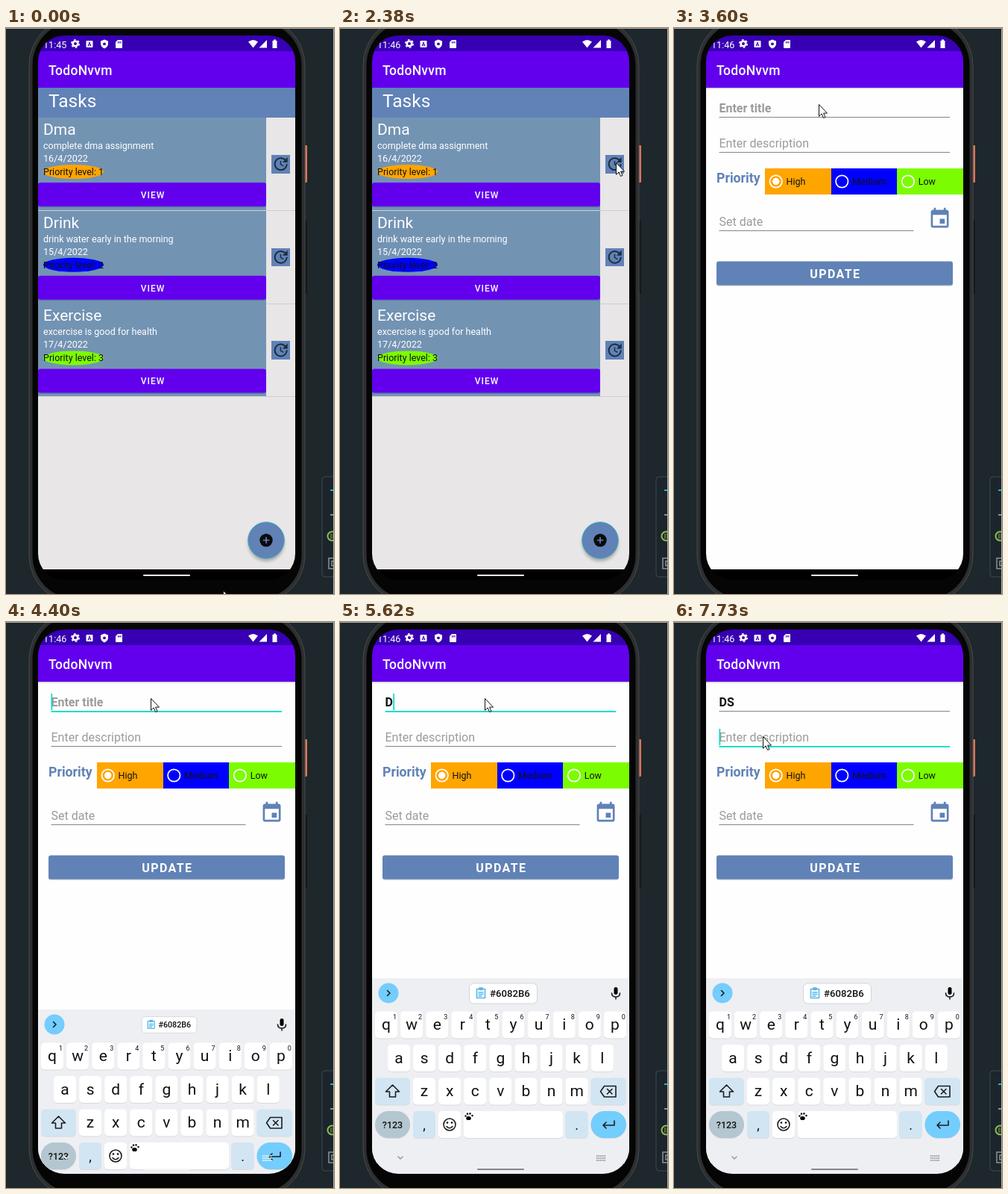
An HTML page for the animation above (8000 ms loop, 440x758 px).

```html
<!DOCTYPE html>
<html lang="en">
<head>
<meta charset="utf-8">
<title>Todo app demo</title>
<style>
html, body { margin: 0; width: 100%; height: 100%; overflow: hidden; background: #1e272b; }
svg { display: block; width: 440px; height: 758px; }
text { font-family: Roboto, sans-serif; fill: #fff; white-space: pre; }
.b { font-weight: 700; }
.m { font-weight: 500; }
.mid { text-anchor: middle; }
.k { fill: #111; }
.hint { fill: #9b9b9b; font-size: 16px; }
.line { fill: none; stroke: currentColor; stroke-width: 1.6; stroke-linecap: round; stroke-linejoin: round; }
</style>
</head>
<body>
<svg viewBox="0 0 440 758" xmlns="http://www.w3.org/2000/svg">
  <defs>
    <clipPath id="screen"><rect x="43" y="10" width="345" height="729" rx="35"/></clipPath>
    <filter id="soft" x="-30%" y="-30%" width="160%" height="170%"><feGaussianBlur stdDeviation="2"/></filter>
  </defs>

  <rect width="440" height="758" fill="#1e272b"/>
  <rect x="400" y="157" width="4" height="50" rx="1" fill="#d9775a"/>
  <rect x="400" y="258" width="4" height="98" rx="1" fill="#15191b"/>
  <rect x="31" y="-14" width="370" height="784" rx="64" fill="#2c2e2f" stroke="#484b4d"/>
  <rect x="35.500" y="-9" width="361" height="774" rx="59" fill="#050505"/>

  <g fill="none">
    <rect x="424" y="601" width="30" height="134" rx="4" fill="#1b252b" stroke="#3c4a54"/>
    <path d="M435 619h5" stroke="#1fb6c4" stroke-width="2"/>
    <path d="M435 652h5" stroke="#8a9297" stroke-width="2"/>
    <circle cx="437.500" cy="680.500" r="6" stroke="#93bd4c" stroke-width="2"/>
    <path d="M436 677v7m3-7v7" stroke="#93bd4c"/>
    <path d="M440 710h-7v14h7m0-10h-3v6h3" stroke="#8a9297" stroke-width="1.500"/>
  </g>
  <path d="M0 .5h439.500v758" fill="none" stroke="#a9adaf"/>

  <g clip-path="url(#screen)">
    <rect x="43" y="10" width="345" height="729" fill="#000"/>
    <g id="list"></g>
    <g id="form"></g>
    <rect x="43" y="10" width="345" height="21" fill="#3700b3"/>
    <rect x="43" y="31" width="345" height="49" fill="#6200ee"/>
    <text class="m" x="57" y="63" font-size="17.500" letter-spacing=".25">TodoNvvm</text>
    <text id="clock" x="50" y="26.500" font-size="12.600"></text>
    <g fill="#fff">
      <circle cx="93" cy="21" r="3.300" fill="none" stroke="#fff" stroke-width="2.600"/>
      <circle cx="93" cy="21" r="5.200" fill="none" stroke="#fff" stroke-width="1.600" stroke-dasharray="2.700 2.745"/>
      <rect x="107.500" y="17" width="9" height="9" rx="1"/>
      <path d="M110 24.500l2-5.500 2 5.500m-3.300-1.700h2.600" fill="none" stroke="#3700b3"/>
      <path d="M132 15.500l5 2v3.500q0 4-5 6.500q-5-2.500-5-6.500v-3.500z"/>
      <circle cx="132" cy="21.300" r="1.900" fill="#3700b3"/>
      <path d="M150 16h5q1 0 1 1v9q0 1-1 1h-7q-1 0-1-1v-7z"/>
      <path d="M150.500 18v2.500m1.800-2.500v2.500m1.800-2.500v2.500" stroke="#3700b3"/>
      <path d="M325 18.500q6.500-5 13 0l-6.500 8z"/>
      <path d="M350 16v10.500h-10.500z"/>
      <path d="M357.500 17h1.500v-1.500h3v1.500h1.500v10h-6z"/>
    </g>
    <g id="board"></g>
    <g id="nav">
      <path class="line" d="M78 716l3 3 3-3"/>
      <path d="M344 715h12m-12 3h12m-12 3h12" stroke="currentColor" stroke-width="1.800" stroke-dasharray="1.600 1"/>
    </g>
    <rect id="pill" x="184" y="732" width="63" height="2" rx="1"/>
  </g>
  <path id="mouse" d="M.5 .5v15.800l3.600-3.400 2.500 5.600 2.400-1-2.400-5.400h4.900z" fill="#fff" stroke="#111" stroke-linejoin="round"/>
</svg>
<script>
const $ = id => document.getElementById(id);
const rect = (x, y, w, h, fill, rx = 0, more = '') =>
  `<rect x="${x}" y="${y}" width="${w}" height="${h}" rx="${rx}" fill="${fill}" ${more}/>`;
const text = (x, y, str, size, cls = '', more = '') =>
  `<text x="${x}" y="${y}" font-size="${size}" class="${cls}" ${more}>${str}</text>`;
const BLUE = '#6082b6', TEAL = '#03dac5', CRISP = 'shape-rendering="crispEdges"';

// Task list
const UPDATE = 'M21 10.120h-6.780l2.740-2.820c-2.730-2.700-7.150-2.800-9.880-.1-2.730 2.710-2.730 7.080 0 9.790s7.150 2.710 9.880 0C18.320 15.650 19 14.080 19 12.100h2c0 1.980-.88 4.550-2.640 6.290-3.510 3.480-9.210 3.480-12.720 0-3.500-3.470-3.530-9.110-.02-12.580s9.140-3.470 12.650 0L21 3zM12.500 8v4.250l3.500 2.080-.72 1.210L11 13V8z';

const task = ([title, note, date, color], i) => `<g transform="translate(0 ${i * 124.7})">
  ${rect(43, 120, 306, 124, '#7393b3', 0, CRISP)}
  ${rect(43, 244, 345, 1, '#cfcfd0', 0, CRISP)}
  ${text(50, 143, title, 21)}
  ${text(50, 162, note, 12.5)}
  ${text(50, 179, date, 12.6)}
  <ellipse cx="90.500" cy="192.500" rx="40.500" ry="9.500" fill="${color}"/>
  ${text(50, 197, 'Priority level: ' + (i + 1), 12.5, 'k')}
  ${rect(43, 208.5, 306, 32, '#3d5f8a', 3, 'opacity=".4"')}
  ${rect(43, 207, 306, 32, '#6200ee', 3)}
  ${text(197, 228, 'VIEW', 12, 'm mid', 'letter-spacing="1.050"')}
  ${rect(356, 170, 25, 24.5, BLUE, 0, CRISP)}
  <path transform="translate(356.700 170)" d="${UPDATE}" fill="#1d2c3c"/>
</g>`;

$('list').innerHTML = rect(43, 80, 345, 645, '#e8e6e7') + rect(43, 80, 345, 40, BLUE) +
  text(57, 106, 'Tasks', 24.5) + [
    ['Dma', 'complete dma assignment', '16/4/2022', '#ffa500'],
    ['Drink', 'drink water early in the morning', '15/4/2022', '#0000ff'],
    ['Exercise', 'excercise is good for health', '17/4/2022', '#7cfc00']
  ].map(task).join('') + `
  <circle cx="349" cy="690" r="24" fill="#000" opacity=".28" filter="url(#soft)"/>
  <circle cx="349" cy="686" r="24.300" fill="${BLUE}" stroke="#38a9bd"/>
  <circle cx="349" cy="686" r="8.700" fill="#0a0a0a"/>
  <path d="M344.700 686h8.600m-4.300-4.300v8.600" stroke="${BLUE}" stroke-width="1.700"/>`;

// Edit form
const EVENT = 'M17 12h-5v5h5zM16 1v2H8V1H6v2H5c-1.110 0-1.990.9-1.990 2L3 19c0 1.100.89 2 2 2h14c1.100 0 2-.9 2-2V5c0-1.100-.9-2-2-2h-1V1zm3 18H5V8h14z';

const radio = ([label, color], i) => {
  const x = 122 + i * 88.6;
  return rect(x, 188, 88.6, 35, color, 0, CRISP) +
    `<circle cx="${x + 14.7}" cy="205.500" r="8.200" fill="none" stroke="#fff" stroke-width="1.700"/>` +
    (i ? '' : `<circle cx="${x + 14.7}" cy="205.500" r="4.700" fill="#fff"/>`) +
    text(x + 28.5, 210, label, 12.5, 'k');
};

$('form').innerHTML = rect(43, 80, 345, 645, '#fefefe') + rect(43, 80, 345, 1.5, '#d5d5d8') +
  text(60.5, 113, 'Enter title', 16, 'hint b', 'id="hint"') +
  text(60.5, 113, '', 16, 'k b', 'id="typed"') +
  text(60.5, 160, 'Enter description', 16, 'hint') +
  text(60.5, 265, 'Set date', 16, 'hint') +
  rect(60.5, 119, 309.5, 1, '#858585', 0, 'id="line0"') +
  rect(60.5, 166, 309.5, 1, '#858585', 0, 'id="line1"') +
  rect(60.5, 271, 261, 1, '#858585') +
  text(57, 207, 'Priority', 17.7, 'b', `style="fill:${BLUE}"`) +
  [['High', '#ffa500'], ['Medium', '#0000ff'], ['Low', '#7cfc00']].map(radio).join('') +
  `<path transform="translate(340.600 239.500) scale(1.330)" d="${EVENT}" fill="${BLUE}"/>` +
  rect(57, 314, 317, 31.5, '#777', 3, 'opacity=".4"') + rect(57, 312.5, 317, 32, BLUE, 3) +
  text(216.4, 335, 'UPDATE', 16, 'b mid', 'letter-spacing="1.400"') +
  rect(0, 0, 1.7, 22, TEAL, 0, 'id="caret"');

// Keyboard
const PALE = '#d2e5f3', SKY = '#73cdfd', PITCH = 34.1;
const key = (x, y, w, fill = '#fff', rx = 5) =>
  rect(x, y + 1, w, 36, '#d9dade', rx) + rect(x, y, w, 36, fill, rx);
const letters = (str, x0, y) => [...str].map((c, i) => {
  const x = x0 + i * PITCH;
  return key(x, y, 30) + text(x + 15, y + 24.5, c, 21, 'k mid') +
    (y < 530 ? text(x + 26.5, y + 10, (i + 1) % 10, 9, 'k mid') : '');
}).join('');

$('board').innerHTML = rect(43, 477, 345, 300, '#eeeff2') +
  letters('qwertyuiop', 47, 521.5) + letters('asdfghjkl', 64, 566) + letters('zxcvbnm', 98, 610.5) +
  key(47, 610.5, 47, PALE) + key(336.5, 610.5, 47.5, PALE) +
  key(47, 655, 47, '#b4c6d0', 18) + key(98, 655, 30, PALE) + key(132, 655, 30) +
  key(166, 655, 133) + key(302, 655, 30.5, PALE) + key(336.5, 655, 47.5, SKY, 18) +
  text(70.5, 678, '?123', 12.5, 'k m mid') + text(113, 680, ',', 18, 'k mid') + text(317.5, 680, '.', 18, 'k mid') +
  `<circle cx="65" cy="497" r="13.500" fill="${SKY}"/>
  <g color="#1c1c1e">
    <path class="line" d="M63.500 493.500l3.500 3.500-3.500 3.500"/>
    <path class="line" d="M70.500 620l-9 9h5v7h8v-7h5z"/>
    <path class="line" d="M354.500 621.500h15.500v14.500h-15.500l-5-7.250zM358.500 625.500l6.500 6.500m0-6.500l-6.500 6.500"/>
    <path class="line" d="M368 668v6h-15m4-4l-4 4 4 4"/>
    <circle class="line" cx="147" cy="673" r="8"/>
    <path class="line" d="M143 675.500q4 4.500 8 0"/>
    <circle cx="144" cy="670.500" r="1.300"/><circle cx="150" cy="670.500" r="1.300"/>
    <ellipse cx="172.500" cy="664.500" rx="3.300" ry="2.600"/>
    <path d="M168.500 661.500v.1m2.500-3v.1m3.500-.3v.1m3 2.500v.1" stroke="currentColor" stroke-width="2.600" stroke-linecap="round"/>
    <rect x="367.500" y="489" width="5" height="10" rx="2.500"/>
    <path class="line" d="M364.500 497q0 5 5.500 5t5.500-5m-5.500 5v3"/>
  </g>
  <g id="chip">
    ${rect(173.5, 484, 91, 27, '#fff', 6, 'stroke="#d3d5d9"')}
    <path class="line" color="#55b7e8" d="M183.500 491.500h11v12h-11zM187 490h4v2.500h-4zM186 496h6m-6 2.500h6m-6 2.500h4"/>
    ${text(201, 502.3, '#6082B6', 13.2, 'k m')}
  </g>`;

// Stepped timelines: [time, ...values]
const at = (track, t) => track.findLast(s => s[0] <= t).slice(1);

const MOUSE = [[0, 291, 753], [260, 269, 657], [400, 238, 490], [520, 223, 350], [640, 214, 268],
  [760, 210, 230], [880, 207, 213], [1000, 207, 208], [1150, 207, 212], [1300, 235, 201],
  [1420, 300, 183], [1550, 345, 174], [1670, 362, 170], [1820, 368, 177], [1950, 370, 180],
  [3180, 270, 148], [3300, 215, 127], [3450, 196, 105], [3600, 194, 102],
  [6950, 165, 120], [7100, 132, 145], [7220, 119, 153]];
const CLOCK = [[0, '11:45'], [2380, '11:46']];
const TYPED = [[0, ''], [5320, 'D'], [6140, 'DS']];
const FOCUS = [[0, -1], [4140, 0], [7610, 1]];
const CARET = [[0, 0], [4280, 1], [4670, 0], [5200, 1], [5870, 0], [6140, 1], [6670, 0], [7220, 1], [7610, 0], [7730, 1]];
const CARET_X = { '': 60.5, D: 71.3, DS: 81.3 };
const BOARD = [[0, 300, .8], [4280, 130, .8], [4400, 42, .81], [4550, 6, .95], [4670, 0, 1]];
const NAV = [[0, '#fff', '#f4f4f4'], [4400, '#f4f8fa', '#f4f4f4'], [4820, '#c8cacc', '#b8b9bb'], [4940, '#9a9c9f', '#85878a']];

const set = (id, attrs) => { for (const k in attrs) $(id).setAttribute(k, attrs[k]); };
const show = (id, on) => { $(id).style.display = on ? '' : 'none'; };

function draw(t) {
  const [typed] = at(TYPED, t), [focus] = at(FOCUS, t), [dy, zoom] = at(BOARD, t), [icons, pill] = at(NAV, t);
  const open = t >= 4280;
  set('mouse', { transform: `translate(${at(MOUSE, t)})` });
  $('clock').textContent = at(CLOCK, t)[0];
  $('typed').textContent = typed;
  show('list', t < 2500);
  show('form', t >= 2500);
  show('hint', !typed);
  [0, 1].forEach(i => set('line' + i, focus === i
    ? { height: 1.8, fill: TEAL }
    : { height: 1, fill: '#858585' }));
  show('caret', at(CARET, t)[0]);
  set('caret', { x: focus === 1 ? 60.5 : CARET_X[typed], y: focus === 1 ? 143 : 96 });
  show('board', open);
  show('nav', open);
  set('board', { transform: `translate(0 ${dy})` });
  set('chip', { transform: `translate(219 497.5) scale(${zoom}) translate(-219 -497.5)` });
  set('nav', { color: icons });
  set('pill', { fill: pill });
}

const start = performance.now();
(function tick() {
  draw((performance.now() - start) % 8000);
  requestAnimationFrame(tick);
})();
</script>
</body>
</html>
```
